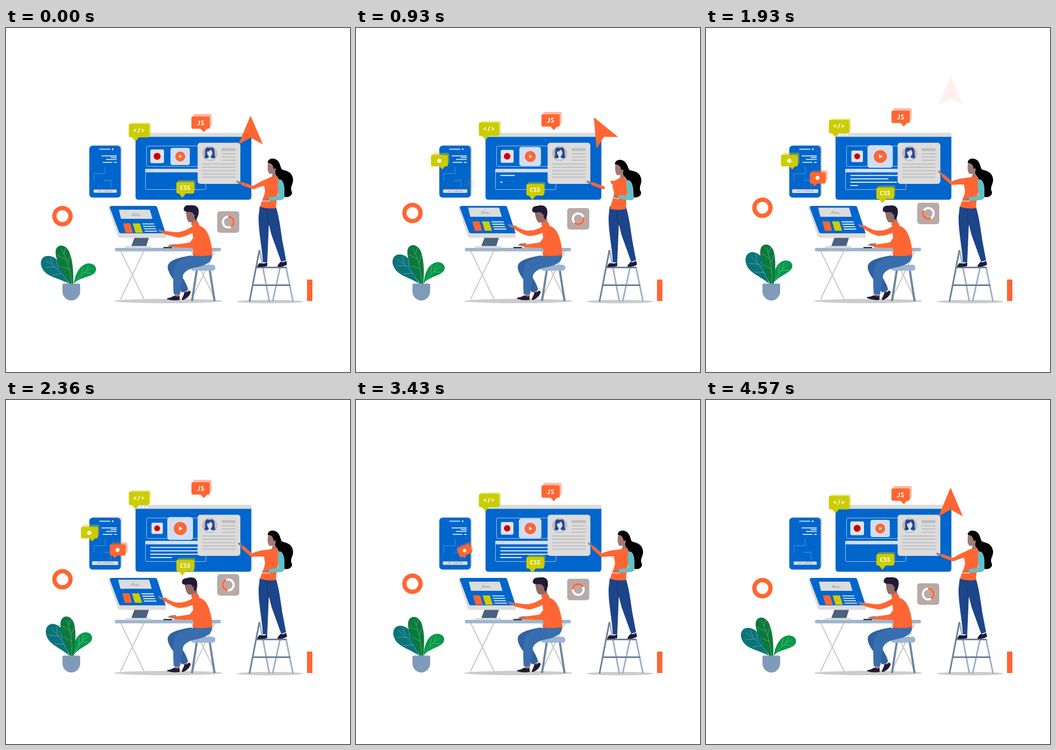
These frames come from a looping animation (640 by 640 pixels, 4780 ms). An HTML page:

```html
<!DOCTYPE html>
<html lang="en">
<head>
<meta charset="utf-8">
<title>Web team at work</title>
<style>
html, body { margin: 0; width: 100%; height: 100%; overflow: hidden; background: #fff; }
svg { display: block; width: 100%; height: 100%; }
text { font: 600 11px "Noto Sans Mono", monospace; fill: #fff; text-anchor: middle; }
.o { fill: #f63; } .y { fill: #cc0; } .b { fill: #06c; } .g { fill: #dcdcdc; }
.skin { fill: #a17a75; } .dark { fill: #1e1a38; } .back { opacity: .45; }
.line { fill: none; stroke: #fff; stroke-width: 1.7; }
.vein { fill: none; stroke: #fff; stroke-width: .6; opacity: .5; }
</style>
</head>
<body>
<svg viewBox="0 0 640 640">
  <!-- shadows -->
  <g fill="#ccc"><ellipse cx="302" cy="508" rx="101" ry="4"/><ellipse cx="491.500" cy="509" rx="62" ry="3.200"/></g>
  <rect class="o" x="560" y="468" width="10" height="40"/>
  <circle id="ring" cx="105" cy="350" r="15" fill="none" stroke="#f63" stroke-width="8"/>

  <!-- plant -->
  <g id="leafL"><path fill="#0b747b" d="M117 476C109 456 101 424 78 424C66 424 62 436 67 446C74 464 100 465 117 476Z"/>
    <path class="vein" d="M117 476Q101 449 74 433M87 440L82 427M97 448L94 432M92 444L73 446M104 457L86 460"/></g>
  <g id="leafR"><path fill="#07984a" d="M126 476C128 462 135 441 152 438C164 437 171 446 166 454C160 464 136 463 126 476Z"/>
    <path class="vein" d="M126 476Q142 454 160 446M140 459L144 444M148 452L154 441M145 455L160 457"/></g>
  <g id="leafM"><path fill="#0a7a3b" d="M118 476C112 462 88 430 93 412C97 402 110 402 117 415C125 432 126 460 125 476Z"/>
    <path class="vein" d="M122 476Q119 440 103 411M108 420L111 408M115 438L119 421M112 430L95 423M118 449L102 443"/></g>
  <path fill="#809aba" d="M105 478Q105 475.500 108 475.500H135Q138 475.500 138 478V490A16.500 17 0 0 1 105 490Z"/>

  <!-- phone -->
  <rect class="g" x="158" y="217" width="58" height="96" rx="6"/>
  <rect class="b" x="155" y="219" width="58.500" height="96.500" rx="6"/>
  <path class="line" d="M173.500 225.500H194M178 238H206M195 241H206M186 244.500H206M180 250H198M201 250H206"/>
  <circle cx="198.500" cy="225.500" r="1.500" fill="#fff"/>
  <path fill="none" stroke="#2a80d6" stroke-width="1.800" d="M163.500 284V271H184.500V258M182 283.500H195.500V297"/>
  <g id="button"><rect class="g" x="163" y="300.500" width="43" height="6" rx="1.500"/>
    <text x="184.500" y="305" style="font-size:4px;fill:#aaa">GET STARTED</text></g>

  <!-- main window -->
  <path class="b" d="M241 200H456.500V314Q456.500 319.500 451 319.500H246.500Q241 319.500 241 314Z"/>
  <path class="g" d="M241 202.500V198Q241 195 244 195H453.500Q456.500 195 456.500 198V202.500Z"/>
  <g fill="#fff"><circle cx="249" cy="198.500" r="1.700"/><circle cx="255.500" cy="198.500" r="1.700"/><circle cx="262" cy="198.500" r="1.700"/></g>
  <g fill="none" stroke="#9cc4ec"><rect x="261.500" y="219.500" width="110" height="38" rx="2"/><rect x="259.500" y="263" width="112.500" height="37.500" rx="2"/></g>
  <path fill="#d2e1f6" d="M259 268.500V264Q259 262 261 262H370.500Q372.500 262 372.500 264V268.500Z"/>
  <g fill="#b3c4da"><circle cx="263" cy="265.300" r="1.200"/><circle cx="268.500" cy="265.300" r="1.200"/><circle cx="274" cy="265.300" r="1.200"/></g>
  <path id="code" class="line" stroke-width="2"/>
  <g id="rec"><rect x="268.500" y="226" width="25.500" height="25.500" rx="3" fill="#dfe3ea"/><circle cx="281.200" cy="238.700" r="6.500" fill="#c00"/></g>
  <g id="play"><rect x="306" y="223" width="36" height="32" rx="4" fill="#cfdef7"/><circle class="o" cx="324.200" cy="239" r="9.200"/><path fill="#fff" d="M322.500 236L327.500 239L322.500 242Z"/></g>

  <!-- profile card -->
  <rect class="g" x="356.500" y="213.500" width="79.500" height="76.500" rx="5"/>
  <circle cx="379" cy="233.500" r="14" fill="#bebebe"/>
  <path fill="#2a4792" d="M369 241C373 235 367 224 375 222Q379 224 383 222C391 224 386 236 390 241L384 243H374Z"/>
  <path fill="#d4e3f8" d="M374 230Q379 230 381 226L384 231Q384 237 381 238V241L386 243Q379 248 372 243L377 241V238Q374 236 374 230Z"/>
  <path stroke="#bebebe" stroke-width="2" d="M401.500 234H427M401.500 240H427M401.500 246H427M365 253H427M365 259H427M365 265.500H427M365 271.500H427M365 277.500H427"/>
  <rect x="401" y="223.500" width="26.500" height="5.500" rx="2" fill="#bebebe"/>
  <path id="arrow" class="o" d="M455 163L478 216.500L455 204L432.500 216.500Z"/>

  <!-- bubbles -->
  <g id="tag"><rect class="y back" x="232" y="176" width="37.500" height="25" rx="3"/>
    <path class="y" d="M231.500 178.500H263.500Q266.500 178.500 266.500 181.500V200.500Q266.500 203.500 263.500 203.500H247L241 211L234.500 203.500H231.500Q228.500 203.500 228.500 200.500V181.500Q228.500 178.500 231.500 178.500Z"/>
    <text x="247.300" y="194.500" style="font-size:12.5px">&lt;/&gt;</text></g>
  <g id="js"><rect class="o back" x="348.500" y="160" width="34" height="23" rx="3"/>
    <path class="o" d="M348 164.500H376Q379 164.500 379 167.500V184.500Q379 187.500 376 187.500H374L368 194L362 187.500H348Q345 187.500 345 184.500V167.500Q345 164.500 348 164.500Z"/>
    <text x="361.700" y="180.500" style="font-size:12px">JS</text></g>
  <g id="css"><rect class="y back" x="319.500" y="283" width="32.500" height="21" rx="3"/>
    <path class="y" d="M320 286.500H347Q350 286.500 350 289.500V305Q350 308 347 308H334.500L328 316L322 308H320Q317 308 317 305V289.500Q317 286.500 320 286.500Z"/>
    <text x="333.300" y="301">CSS</text></g>
  <g id="chipA"><rect class="y back" x="142.500" y="232" width="31" height="21" rx="3"/>
    <path class="y" d="M142.500 236H168Q171 236 171 239V254.500Q171 257.500 168 257.500H165.500L160.500 263L155 257.500H142.500Q139.500 257.500 139.500 254.500V239Q139.500 236 142.500 236Z"/>
    <circle cx="155" cy="247" r="3.800" fill="#fff"/></g>
  <g id="chipB"><rect class="o back" x="196" y="265" width="30" height="20" rx="3"/>
    <path class="o" d="M196 268.500H219.500Q222.500 268.500 222.500 271.500V286.500Q222.500 289.500 219.500 289.500H207L202 294.500L198 289.500H196Q193 289.500 193 286.500V271.500Q193 268.500 196 268.500Z"/>
    <circle cx="207.500" cy="279" r="3.800" fill="#fff"/></g>

  <g id="chart"><rect x="393" y="341" width="41" height="40" rx="5" fill="#b8aaa8"/>
    <g fill="none" stroke-width="4"><circle cx="413.500" cy="361" r="10" stroke="#fff"/>
    <path id="arc" stroke="#f63" d="M413.500 351A10 10 0 0 1 418.500 369.660"/></g></g>

  <!-- desk and computer -->
  <path stroke="#ccc" stroke-width="2.200" d="M213 414L257 505M257 414L213 505M345 414L389 505M389 414L345 505"/>
  <rect x="202.500" y="409" width="197.500" height="6.500" rx="3" fill="#9fb5cc"/>
  <path fill="#4a617f" d="M239 390H266L261 406H233Z"/>
  <rect class="g" x="222" y="405.500" width="48.500" height="4" rx="1.500"/>
  <path class="g" d="M194 331H280L297 382V390.500H213Q209 390.500 208 387L190.500 336Q189.500 331 194 331Z"/>
  <path class="b" d="M197 331H277Q280 331 281 333L297 382H214Q211 382 210 379L193.500 335Q193 331 197 331Z"/>
  <g id="page">
    <path class="g" d="M210 338H267.500L272.500 355H214Z"/>
    <path fill="#bebebe" d="M232.500 349.500L237 343L242 347L245 345L252.500 349.500Z"/><circle cx="241" cy="340.500" r="1" fill="#bebebe"/>
    <path class="o" d="M217.500 363.500H231L236 381H222.500Z"/><path class="y" d="M235.500 363.500H249L254.500 381H241Z"/>
    <path class="line" d="M253.500 364.500H276M255 369H277.500M256.500 373.500H279M258 378H281"/>
  </g>
  <path stroke="#111" stroke-width="2" d="M293 408.500H309"/>

  <!-- stool and seated man -->
  <path stroke="#6f869c" stroke-width="4" d="M355 450L346 508M379 450L388 508"/>
  <rect x="344" y="440.500" width="45.500" height="11" rx="5" fill="#9db5d3"/>
  <path class="skin" d="M328 489L335 486L340 493L334 497Z"/>
  <path class="dark" d="M333 491Q337 494 340 488L344 491Q341 501 330 506Q325 506 328 502Z"/>
  <path fill="#2f62a3" d="M345 423C315 428 299 434 301 447C303 461 320 476 327 492L339 487C336 474 326 461 322 453L345 445Z"/>
  <g id="foot"><path class="skin" d="M314 492H323V502H314Z"/><path class="dark" d="M313 498Q318 501 323 499V506Q310 508 299 504.500Q300 502 306 501.500Z"/></g>
  <path fill="#386eae" d="M350 423L383 422C384 436 372 442 350 446C338 449 329 455 329 463L324 495H312C311 480 310 455 315 441C320 430 335 428 350 423Z"/>
  <path class="skin" d="M345 352H355L357 367H345Z"/>
  <g id="head"><path class="skin" style="fill:#916b66" d="M335 340L352 342L354 356Q349 363 340 361Q335 356 335 340Z"/>
    <path class="dark" d="M337 342Q329 341 331 335Q333 329 341 330Q357 328 358.500 339Q359 350 353 357Q349 353 352 347L349 348Q350 341 337 342Z"/></g>
  <path class="o" d="M345 363Q352 358 358 362L360 368Q374 372 380 395Q384 410 384 422Q366 426 347 423Q350 410 349 395Q346 378 347 370Z"/>
  <path fill="#e85020" d="M363 379Q362 397 347 412L351 394Z"/>
  <g id="reach"></g>
  <g id="type"><path class="skin" d="M316 402L306 403L300 406L312 408.500L317 408Z"/></g>
  <path class="o" d="M366 375C377 383 367 400 352 409Q335 409 313 408.500V403Q330 401 342 399L354 383Q358 374 366 375Z"/>

  <!-- ladder -->
  <g fill="none" stroke="#9bb2c9" stroke-width="3"><path d="M472 414L490 509M521 445L534 509M510 445L496 509"/>
    <path stroke="#6c8097" d="M471.500 413L453 509M464 445.500H522M459 478.500H529"/></g>

  <!-- standing woman -->
  <path class="dark" d="M472 437Q478 440 486 436V443Q479 445 467.500 444.500Q467 442 472 437ZM511 435Q516 437 521 433L523 440Q517 445 505 444Q505 441 511 435Z"/>
  <path fill="#1d4589" d="M472 332H502C508 350 511 375 514 395L521 432L512 435L494 385L489 365L486 436H478C476 405 469 375 470 350Z"/>
  <path fill="none" stroke="#153672" d="M486 337Q484 352 489 367"/>
  <g id="body">
    <path class="skin" d="M488 250C486 257 486 270 491 271.500L496 271L494 279L504 279L506 258L498 248Z"/>
    <path d="M487 251C487 243 496 241 503 245C510 249 510 258 513 263C520 266 532 266 534 281C535 291 527 296 532 305C533 313 524 316 517 314C511 300 512 287 503 274C498 268 504 264 501 261L498 262Q497 251 487 251Z"/>
    <path class="o" d="M493 277H503C509 280 512 286 509 296C505 310 503 322 502 335Q487 337 473 333C474 323 481 314 482 303C480 292 476 284 493 277Z"/>
    <path fill="#65bfc6" d="M506 283C511 279 517 284 518 298V316Q512 322 506 316C508 306 504 293 506 283Z"/>
    <g id="fore"><path fill="none" stroke="#fff" d="M473 322H491"/><path class="skin" d="M491 315L482 317L478.500 319.500L491 321Z"/>
      <path fill="#65bfc6" d="M489 315L508 312Q518 309 518 315Q517 320 508 320.500L489 321Z"/></g>
  </g>
  <g id="arm"></g>
</svg>
<script>
const LOOP = 4780, STEP = 71.5;
const $ = id => document.getElementById(id);
const set = (id, name, value) => $(id).setAttribute(name, value);
const place = (id, value) => set(id, 'transform', value);
const rise = (id, dy) => place(id, `translate(0 ${dy})`);
const turn = (id, deg, x, y) => place(id, `rotate(${deg} ${x} ${y})`);
const mix = (a, b, t) => a + (b - a) * t;
const clamp = (v, lo, hi) => Math.min(hi, Math.max(lo, v));

function grow(id, s, x, y, deg = 0) {
  place(id, `translate(${x} ${y}) rotate(${deg}) scale(${s}) translate(${-x} ${-y})`);
}

function stroke(color, width, ...points) {
  return `<polyline points="${points.join(' ')}" fill="none" stroke="${color}" stroke-width="${width}" stroke-linecap="round" stroke-linejoin="round"/>`;
}

function draw(k) {
  const wave = n => (1 - Math.cos(2 * Math.PI * n * k / 64)) / 2;
  const ramp = (a, b) => (1 - Math.cos(Math.PI * clamp((k - a) / (b - a), 0, 1))) / 2;
  const sway = wave(1);

  turn('leafL', 12 * sway, 118, 478);
  turn('leafM', 8.5 * sway, 122, 478);
  turn('leafR', -13 * sway, 126, 478);
  rise('ring', -16.5 * sway);
  rise('tag', -8 * sway);
  rise('js', -11.5 * sway);
  rise('css', 10.8 * sway);
  rise('chart', -17 * sway);
  turn('arc', 360 * k / 64, 413.5, 361);
  grow('play', 1 + .33 * sway, 324, 239);
  grow('rec', 1 - .17 * sway, 281.2, 238.7);
  grow('button', 1 + .14 * sway, 184.5, 303.5);

  // pointer: swing left and back, fly off, fade in again
  const fly = k < 40 ? -73 * ramp(15.5, 25.5) : 0;
  const swing = -90 * (ramp(0, 8) - ramp(8, 16));
  place('arrow', `translate(0 ${fly}) rotate(${swing} 455 190)`);
  set('arrow', 'opacity', 1 - ramp(21, 28.5) + ramp(53, 62));

  // chips pop in and out around their tips
  const a = ramp(3, 10) - ramp(36, 44), b = ramp(12, 19.5) - ramp(44, 52);
  grow('chipA', Math.min(1, .5 + .7 * a), 160.5, 262, 48 * (1 - a));
  set('chipA', 'opacity', clamp(a * 2, 0, 1));
  grow('chipB', Math.min(1, .6 + .5 * b), 202, 293, (k < 32 ? 45 : -45) * (1 - b));
  set('chipB', 'opacity', clamp(b * 2, 0, 1));

  // code being typed: start step, speed, longest length
  const rows = [[7.6, 5, 100], [15, 5.9, 95], [12.3, 5.9, 100], [24.5, 5.6, 40]];
  set('code', 'd', rows.map(([start, speed, max], i) => {
    const len = clamp((k - start) * speed, 0, max);
    return len ? `M268.500 ${274.3 + 6.3 * i}h${len}` : '';
  }).join(''));
  set('code', 'opacity', 1 - ramp(54, 62));

  // man
  const up = ramp(1, 7) - ramp(41, 47.5);
  place('page', `translate(${-1.3 * up} ${-3.8 * up})`);
  turn('head', -8 * wave(3), 348, 362);
  turn('foot', 9 * wave(4), 322, 500);
  rise('type', -2 * up);
  const handY = mix(378, 368, up);
  const elbowY = mix(385, 382, up);
  $('reach').innerHTML =
    stroke('#a17a75', 4.5, [287, handY], [298, handY + 3]) +
    stroke('#a17a75', 2, [283.5, handY - 2.5], [290, handY]) +
    `<path class="o" d="M294 ${handY - 1}Q310 ${elbowY - 5} 321 ${elbowY - 5}Q336 377 348 368L357 376Q338 387 322 ${elbowY + 5}Q310 ${elbowY + 3} 293 ${handY + 5}Z"/>`;

  // woman
  const lean = k < 20 ? Math.sin(Math.PI * k / 20) : 0;
  place('body', `translate(0 ${3 * lean}) rotate(${-4 * lean} 488 333)`);
  turn('fore', 18 * lean, 514, 317);
  const lift = ramp(18, 26) - ramp(50, 63);
  const elbow = [mix(460, 457, lift), mix(297, 289, lift)];
  const hand = [mix(430, 433, lift), mix(286, 267, lift)];
  const along = t => [mix(hand[0], elbow[0], t), mix(hand[1], elbow[1], t)];
  const joint = [elbow[0] + 16 * lean, elbow[1] - 11 * lean];
  $('arm').innerHTML =
    stroke('#a17a75', 3, hand, along(.35)) +
    stroke('#a17a75', 1.5, [hand[0] + 1, hand[1] - 1], [hand[0] + 5, hand[1] + 1]) +
    stroke('#f63', 6, along(.35), elbow) +
    `<path class="o" d="M${joint[0] - 1} ${joint[1] - 3}Q${joint[0] + 14} ${mix(285, 279, lift)} 491 278L489 292Q${joint[0] + 16} ${mix(293, 290, lift)} ${joint[0] + 1} ${joint[1] + 3}Z"/>`;
}

function tick(now) {
  draw(Math.min(64, Math.floor((now % LOOP + 8) / STEP)));
  requestAnimationFrame(tick);
}
tick(performance.now());
</script>
</body>
</html>
```
